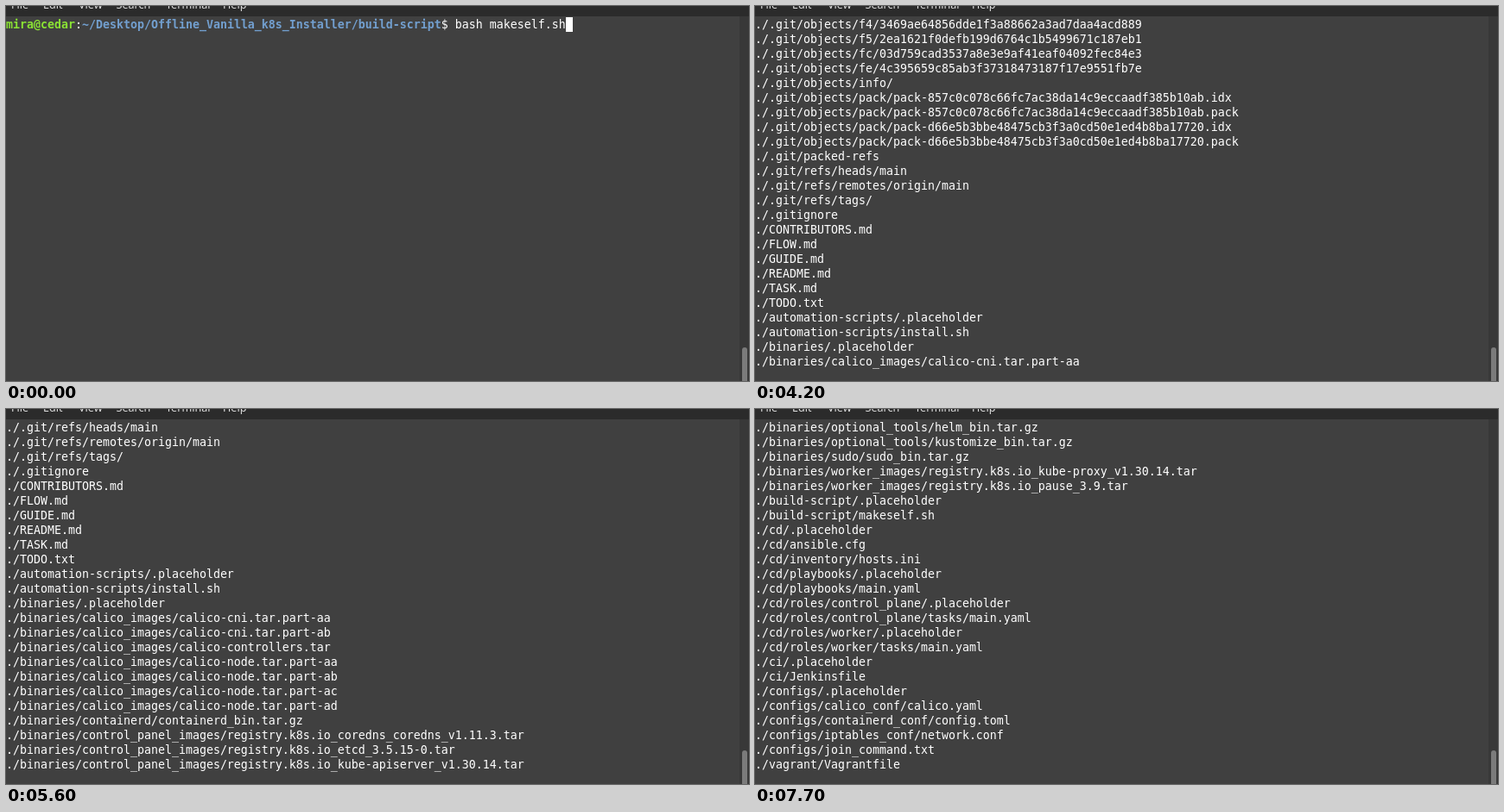
Recreate the animation shown at these times as an HTML page. Size 860 by 435 pixels, loop 8 s.

```html
<!DOCTYPE html>
<html lang="en">
<head>
<meta charset="utf-8">
<title>Terminal build</title>
<style>
html, body { margin: 0; width: 100%; height: 100%; overflow: hidden; background: #404040; }
#stage { position: relative; width: 860px; height: 435px; overflow: hidden; background: #404040; }
#menu { position: absolute; inset: 0 0 auto 0; height: 12px; overflow: hidden; background: #2b2b2b; }
#menu span { position: absolute; top: -10px; font: 12.6px/18px "Noto Sans", "Open Sans", sans-serif; color: #e0e0e0; }
#screen {
  position: absolute; left: 0; top: 13px; margin: 0; color: #fff; white-space: pre;
  font: 13.29px/17px "DejaVu Sans Mono", monospace; font-variant-ligatures: none;
}
#screen b { color: #8ae234; }
#screen b + b { color: #729fcf; }
#cursor { position: absolute; width: 8px; height: 17px; background: #fff; }
#track { position: absolute; left: 849px; top: 12px; width: 11px; height: 423px; background: #383838; }
#thumb { position: absolute; left: 3px; top: 384px; width: 6px; height: 60px; border-radius: 3px; background: #7b7b7b; }
</style>
</head>
<body>
<div id="stage">
  <div id="menu"></div>
  <pre id="screen"></pre>
  <div id="cursor"></div>
  <div id="track"><div id="thumb"></div></div>
</div>
<script>
const LOOP = 8000, ROWS = 24, ROW_H = 17, COL_W = 8, TOP = 13;
const $ = id => document.getElementById(id);

const menu = [["File", 6], ["Edit", 43], ["View", 84], ["Search", 127.5], ["Terminal", 185], ["Help", 251]];
$("menu").innerHTML = menu.map(([name, x]) => `<span style="left:${x}px">${name}</span>`).join("");

const user = "mira@cedar";
const path = "~/Desktop/Offline_Vanilla_k8s_Installer/build-script";
const command = "$ bash makeself.sh";
const promptCols = `${user}:${path}${command}`.length;

// Puts one folder in front of each file in a block of text.
const under = (dir, text) => text.trim().split(/\s+/).map(file => dir + file);

const lines = [
  `<b>${user}</b>:<b>${path}</b>${command}`,
  "Header is 715 lines long",
  "",
  "About to compress 2306764 KB of data...",
  'Adding files to archive named "k8s-installer-v1.run"...',
  ...under("./.git/objects/", `
    de/e390005c9a781cb3a4af32307349d653031e1d
    df/1f63bad9d12f2455662119dc57d62fccdf74a0
    e4/098d61f5101a8db899ccf38997ffaf81e1f447
    e4/bc685f2d602570a50435516cb5e18564150545
    e5/6ef4f0330594658952c1e9e0f6b6087f6408f2
    e6/a40bf6c77f7a9ea93d6c4f2118bc905e8c9265
    e7/654fee35a90a4be3ec2404214eba0732fb0b62
    e8/2e425c64aa5b308ea49612f4e6103a91acc4a7
    ec/76f7efd71406a35f570310673b90d03b026071
    ec/ae670ad405013fbf2da91993881c9cc38bb570
    ec/b99fe8c57acb769ea1e35c4ecee8a06b78077c
    ee/39e94b6421760bcf23e43b4c1c97f8ed8e60cc
    ee/da2165cb193066a7e4c0e47d7e15d6f1fd6cd9
    f2/dd7bf8216bd31d0b0459f8010ac84bb7b64620
    f3/030216043428608cffe62cac10125a88142019
    f3/31e995547f05b74211418764678b1cd43e1378
    f3/45219bbb017ac42adea02272019b049bdaa9bb
    f4/3469ae64856dde1f3a88662a3ad7daa4acd889
    f5/2ea1621f0defb199d6764c1b5499671c187eb1
    fc/03d759cad3537a8e3e9af41eaf04092fec84e3
    fe/4c395659c85ab3f37318473187f17e9551fb7e
    info/
    pack/pack-857c0c078c66fc7ac38da14c9eccaadf385b10ab.idx
    pack/pack-857c0c078c66fc7ac38da14c9eccaadf385b10ab.pack
    pack/pack-d66e5b3bbe48475cb3f3a0cd50e1ed4b8ba17720.idx
    pack/pack-d66e5b3bbe48475cb3f3a0cd50e1ed4b8ba17720.pack`),
  ...under("./.git/", "packed-refs refs/heads/main refs/remotes/origin/main refs/tags/"),
  ...under("./", `
    .gitignore CONTRIBUTORS.md FLOW.md GUIDE.md README.md TASK.md TODO.txt
    automation-scripts/.placeholder automation-scripts/install.sh binaries/.placeholder`),
  ...under("./binaries/calico_images/calico-", `
    cni.tar.part-aa cni.tar.part-ab controllers.tar
    node.tar.part-aa node.tar.part-ab node.tar.part-ac node.tar.part-ad`),
  "./binaries/containerd/containerd_bin.tar.gz",
  ...under("./binaries/control_panel_images/registry.k8s.io_", `
    coredns_coredns_v1.11.3.tar etcd_3.5.15-0.tar kube-apiserver_v1.30.14.tar
    kube-controller-manager_v1.30.14.tar kube-proxy_v1.30.14.tar
    kube-scheduler_v1.30.14.tar pause_3.9.tar`),
  ...under("./binaries/", `
    iptables/iptables_bin.tar.gz
    kube/cri-tools_1.30.1-1.1_amd64.deb
    kube/crictl-v1.30.0-linux-amd64.tar.gz
    kube/kubeadm_1.30.14-1.1_amd64.deb
    kube/kubectl_1.30.14-1.1_amd64.deb
    kube/kubelet_1.30.14-1.1_amd64.deb
    kube/kubernetes-cni_1.4.0-1.1_amd64.deb
    optional_tools/helm_bin.tar.gz
    optional_tools/kustomize_bin.tar.gz
    sudo/sudo_bin.tar.gz
    worker_images/registry.k8s.io_kube-proxy_v1.30.14.tar
    worker_images/registry.k8s.io_pause_3.9.tar`),
  ...under("./build-script/", ".placeholder makeself.sh"),
  ...under("./cd/", `
    .placeholder ansible.cfg inventory/hosts.ini playbooks/.placeholder playbooks/main.yaml
    roles/control_plane/.placeholder roles/control_plane/tasks/main.yaml
    roles/worker/.placeholder roles/worker/tasks/main.yaml`),
  ...under("./ci/", ".placeholder Jenkinsfile"),
  ...under("./configs/", `
    .placeholder calico_conf/calico.yaml containerd_conf/config.toml
    iptables_conf/network.conf join_command.txt`),
  "./vagrant/Vagrantfile"
];

// [time in ms, lines printed so far]
const steps = [
  [0, 1], [1000, 5], [1300, 29], [3200, 31], [4200, 46], [4500, 47], [4700, 48],
  [4800, 49], [5000, 50], [5200, 51], [5300, 53], [5400, 54], [5500, 55], [5600, 56],
  [5700, 57], [5800, 58], [5900, 63], [6000, 66], [6200, 71], [6300, lines.length]
];
const blinks = [400, 1000, 1600, 2200, 2900, 3500, 4200, 4800, 5400, 5900, 6500, 7100, 7700];

const cursor = $("cursor");
let shown = 0;

function print(count) {
  const view = lines.slice(Math.max(0, count - ROWS), count);
  const typing = count === 1;
  $("screen").innerHTML = view.join("\n");
  cursor.style.left = (typing ? promptCols * COL_W : 0) + "px";
  cursor.style.top = TOP + (typing ? 0 : view.length * ROW_H) + "px";
  shown = count;
}

function draw(t) {
  const count = steps.filter(([at]) => at <= t).pop()[1];
  if (count !== shown) print(count);
  const toggles = blinks.filter(at => at <= t).length;
  cursor.style.visibility = toggles % 2 ? "hidden" : "visible";
}

const start = performance.now();
function tick() {
  draw((performance.now() - start) % LOOP);
  requestAnimationFrame(tick);
}
tick();
</script>
</body>
</html>
```
